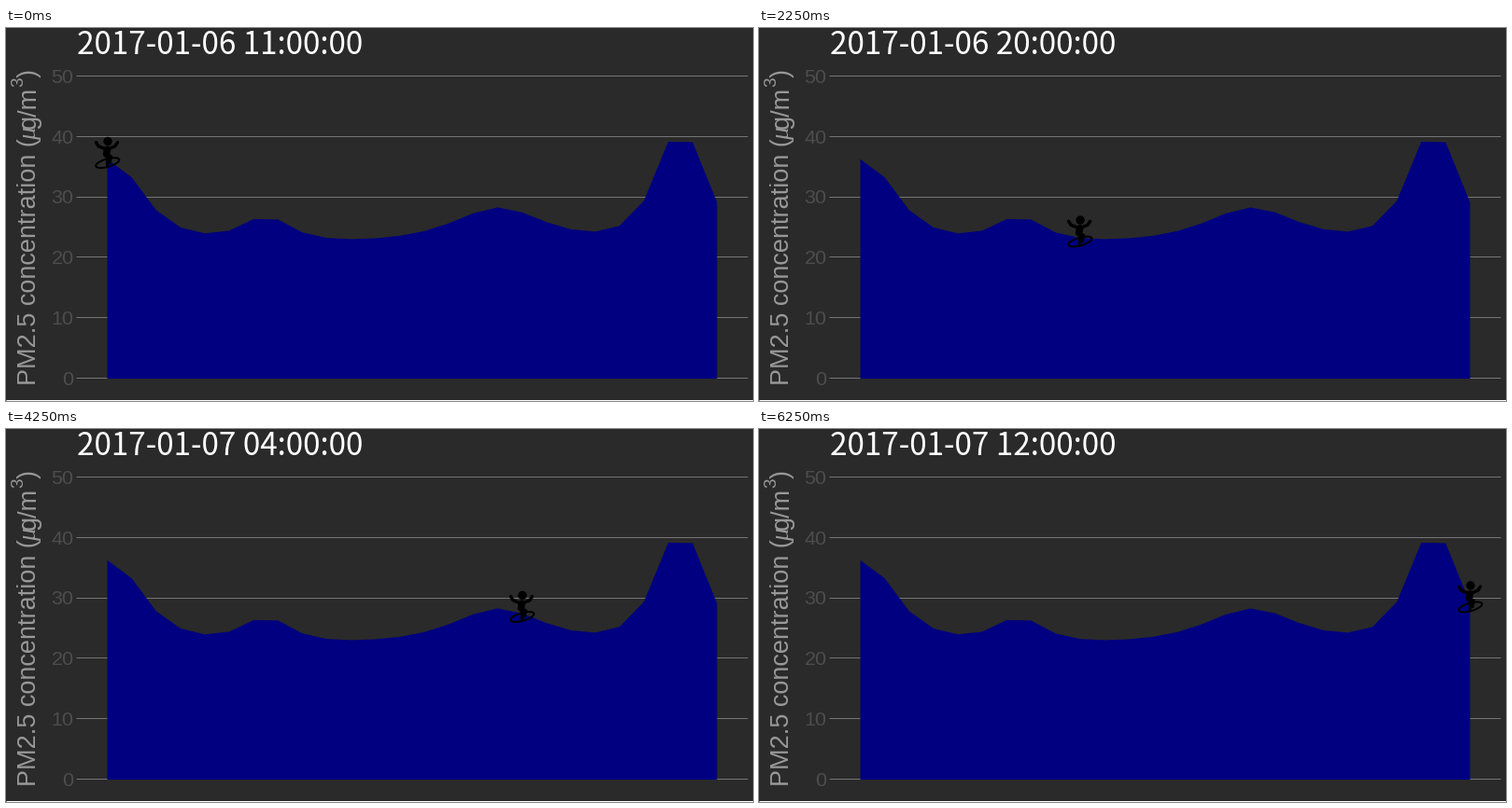
Write a matplotlib script that moves like this. It is 800 px wide and 400 px high and loops after 6.5 s.

```python
import numpy as np
import matplotlib.pyplot as plt
from matplotlib.animation import FuncAnimation
from matplotlib.patches import Circle, Ellipse
from matplotlib.transforms import Affine2D

DPI = 100
PX = 72 / DPI  # points per pixel
BG, GRID, NAVY = "#2a2a2a", "#757575", "#000080"
BASE, UNIT = 375, 6.48  # pixel row of zero, pixels per unit
HOURS = 26


def swell(t, centre, height, steep):
    return height / np.cosh(steep * (t - centre))


def concentration(t):
    """Calm background level with four swells over the day."""
    return (22.55 + swell(t, 0.15, 13.8, 0.88) + swell(t, 6.5, 4.2, 1.15)
            + swell(t, 16.05, 5.7, 0.6) + swell(t, 23.5, 19.3, 1.17))


hours = np.arange(HOURS)
xs = np.linspace(108, 761, HOURS)
ys = BASE - UNIT * concentration(hours)

fig = plt.figure(figsize=(8, 4), dpi=DPI, facecolor=BG)
ax = fig.add_axes([0, 0, 1, 1])
ax.set(xlim=(0, 800), ylim=(400, 0))
ax.axis("off")


def label(x, y, text, size, color, font="Liberation Sans", **kw):
    return ax.text(x, y, text, fontsize=size * PX, color=color, family=font,
                   va="baseline", **kw)


def upright(x, y, text, size=27.1, **kw):
    label(x, y, text, size, "#999999", rotation=90, rotation_mode="anchor", **kw)


def rule(x0, x1, y, color):
    ax.plot([x0, x1], [y, y], color=color, lw=PX, zorder=1,
            solid_capstyle="butt")


# Grid, tick labels and bottom edge
for v in range(0, 51, 10):
    y = BASE - UNIT * v
    rule(75, 794, y, GRID)
    label(72.5, y + 7.9, str(v), 21.5, "#4d4d4d", ha="right")
rule(0, 800, 399, "white")

# Axis title
upright(32, 383, "PM2.5 concentration (")
upright(32, 120, "μ", font="Liberation Serif", style="italic")
upright(32, 107.5, "g/m")
upright(18, 63, "3", 19)
upright(32, 53, ")")

ax.fill_between(xs, ys, BASE + 0.5, color=NAVY, lw=0, zorder=2)

# Surfer, drawn around the current data point
spot = Affine2D()
place = spot + ax.transData


def limb(points, width):
    ax.plot(*zip(*points), color="black", lw=width * PX, zorder=4,
            transform=place, solid_capstyle="round", solid_joinstyle="round")


for side in (-1, 1):
    limb([(11.5 * side, -17.5), (9 * side, -13.5), (3 * side, -11)], 3.4)
limb([(0.5, -10), (-0.5, -5)], 7.5)
limb([(-0.5, -4), (4.5, -2.5), (3, 4)], 3.4)
limb([(-0.5, -3), (-0.5, 6)], 3.2)
for part in (Circle((1, -18.7), 4.7, fc="black", lw=0),
             Ellipse((0.8, 4.4), 26, 8.5, angle=-16, fill=False,
                     ec="black", lw=2 * PX)):
    part.set_transform(place)
    part.set_zorder(4)
    ax.add_artist(part)

clock = label(75.6, 28, "", 33.35, "white", font="Noto Sans CJK JP")


def update(i):
    day, hour = divmod(11 + i, 24)
    clock.set_text(f"2017-01-{6 + day:02d} {hour:02d}:00:00")
    spot.clear().translate(xs[i], ys[i])
    return [clock]


anim = FuncAnimation(fig, update, frames=HOURS, interval=250,
                     repeat=True, repeat_delay=0, blit=False)
plt.show()
```
